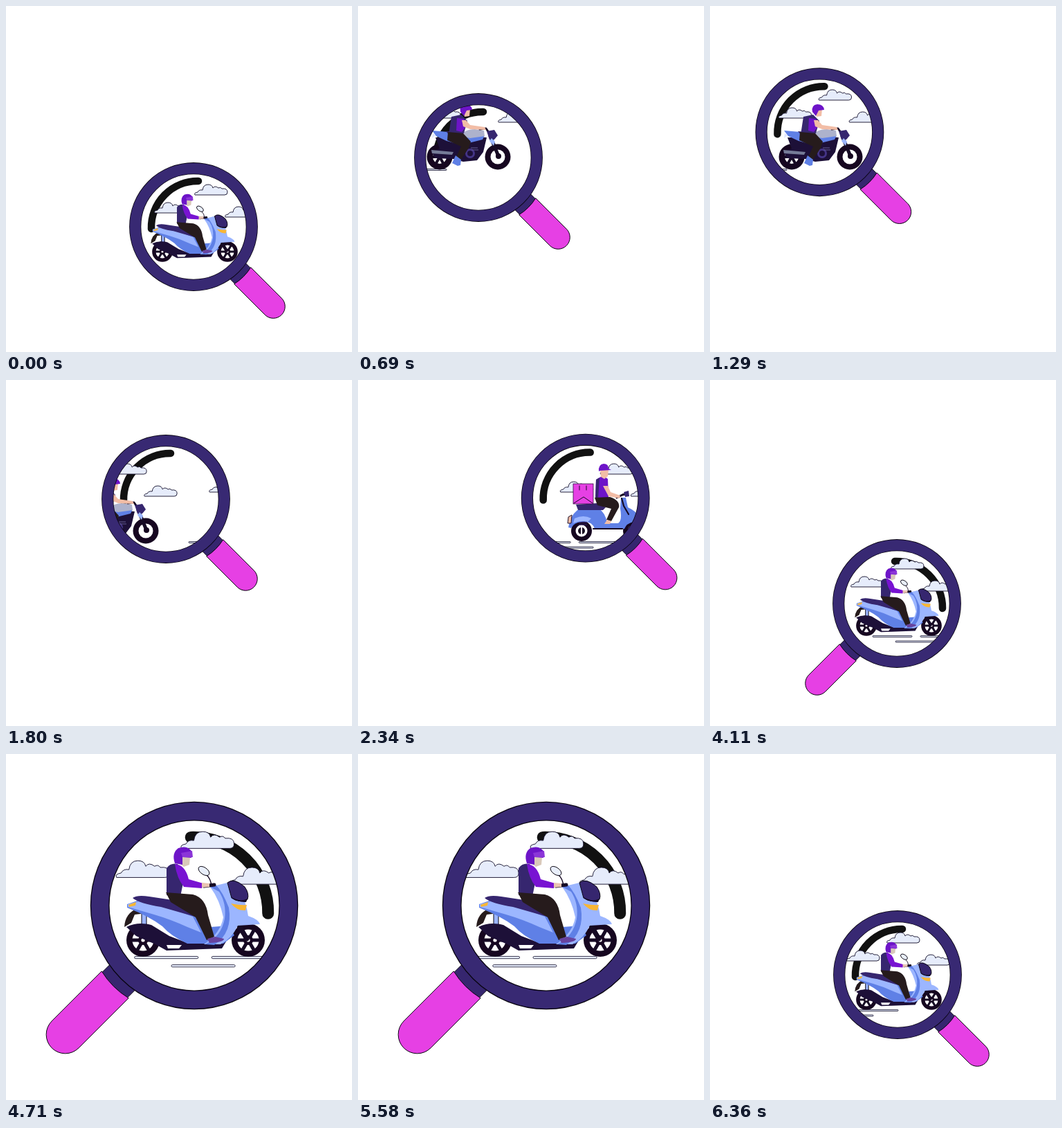
These frames come from a looping animation (500 by 500 pixels, 6.39 s). An HTML page:

```html
<!DOCTYPE html>
<html lang="en">
<head>
<meta charset="utf-8">
<title>Searching for a rider</title>
<style>
  html, body { margin: 0; width: 100%; height: 100%; overflow: hidden; background: #fff; }
  svg { display: block; width: 100vw; height: 100vh; }
  .edge { stroke: #08040f; stroke-width: 1; vector-effect: non-scaling-stroke; }
  .cloud { fill: #e6ecfb; stroke: #100c28; stroke-width: .9; vector-effect: non-scaling-stroke; }
  .streak { fill: #e6ecfb; stroke: #100c28; stroke-width: .8; vector-effect: non-scaling-stroke; }
  .tyre { fill: #160620; }
  .rim { fill: #fff; }
  .navy { fill: #36266f; }
  .night { fill: #1d1038; }
  .sky { fill: #9cb6ff; }
  .blue { fill: #5f80e6; }
  .violet { fill: #6d14c8; }
  .pants { fill: #261b1c; }
  .skin { fill: #f2bda6; }
  .pink { fill: #e640e4; }
  .line { fill: none; stroke: #160a24; stroke-linecap: round; stroke-linejoin: round; }
</style>
</head>
<body>
<svg viewBox="0 0 500 500">
  <defs>
    <clipPath id="hole"><circle id="holeDisc" r="77"/></clipPath>
    <path id="cloud" class="cloud" d="M1 16Q-1 13 5 12Q7 8 12 9Q13 1 20 1Q26 1 27 6Q30 2 35 6Q38 4 40 7Q48 6 48 12Q48 16 44 16Z"/>
    <g id="clouds">
      <use href="#cloud" x="272" y="257"/>
      <use href="#cloud" x="214" y="283"/>
      <use href="#cloud" x="316" y="289"/>
    </g>
    <g id="streaks">
      <rect class="streak" x="-69" y="369.5" width="57" height="2" rx="1"/>
      <rect class="streak" x="0" y="369.5" width="57" height="2" rx="1"/>
      <rect class="streak" x="-36" y="377" width="57" height="2" rx="1"/>
    </g>
    <g id="alloy">
      <circle class="tyre" r="24"/>
      <circle class="rim" r="15.5"/>
      <path class="line" stroke-width="5" d="M-15 0H15M-7.5 -13L7.5 13M7.5 -13L-7.5 13"/>
      <circle class="tyre" r="7"/>
      <circle class="rim" r="2.6"/>
    </g>
  </defs>

  <g id="glare"><path d="M-61 3A67 67 0 0 1 7 -66" fill="none" stroke="#111" stroke-width="10.5" stroke-linecap="round"/></g>

  <g clip-path="url(#hole)">
    <g id="others">
      <g transform="translate(-112 -137)">
        <use class="drift" href="#clouds"/>
        <use id="bikeStreaks" href="#streaks"/>
      </g>
      <g transform="translate(84 -137)">
        <use class="drift" href="#clouds"/>
        <use id="vanStreaks" href="#streaks"/>
      </g>

      <g id="motorbike">
        <circle class="tyre" cx="118" cy="218" r="18.5"/>
        <circle class="rim" cx="118" cy="218" r="10"/>
        <path class="line" stroke-width="4" d="M108 218H128M113 209L123 227M123 209L113 227"/>
        <circle class="tyre" cx="202" cy="218" r="18.5"/>
        <circle class="rim" cx="202" cy="218" r="10.5"/>
        <path class="line" stroke-width="5" d="M191 188L203 217"/>
        <circle class="tyre" cx="203" cy="217" r="4"/>
        <path class="night" d="M112 190L135 190L150 187L186 190L181 211L172 223L152 225L138 221L112 220L106 211L118 206Z"/>
        <path d="M106 208L138 211L136 215L107 213Z" fill="#767c98"/>
        <path class="blue" d="M107 180L130 182L150 190L147 200L128 195L113 188Z"/>
        <path class="navy" d="M127 181L152 183L151 191L133 188Z"/>
        <path class="blue" d="M149 190L183 187L180 193L156 199Z"/>
        <path d="M149 188Q153 178 169 178L182 180L183 188L162 191Z" fill="#adb2cc"/>
        <path class="line" stroke-width="3" d="M176 178L185 177L190 184"/>
        <path class="navy" d="M186 181L197 179L202 187L197 193L190 193Z"/>
        <path class="sky" d="M193 191L198 196L196 202L190 195Z"/>
        <path d="M108 184L112 187L107 191Z" fill="#dfe5ff"/>
        <circle cx="162" cy="213" r="7" fill="#443486"/>
        <circle class="night" cx="162" cy="213" r="4"/>
        <path d="M163 205h10M164 208h10" stroke="#635c91"/>
        <path class="navy" d="M135 160L149 157L158 166L153 184L131 186Z"/>
        <path class="violet" d="M143 162L153 163L157 173L150 182L142 180Z"/>
        <path class="skin" d="M150 165L156 165L162 172L183 175L185 179L162 178L152 174Z"/>
        <path class="skin" d="M151 149L162 149L161 159L154 160Z"/>
        <path class="violet" d="M148 153Q146 143 155 142Q164 142 165 150L157 151L153 159Z"/>
        <path class="pants" d="M130 182L152 184L163 196L160 205L149 222L142 218L149 203L129 194Z"/>
        <path class="blue" d="M141 216L149 222L148 230L144 231L136 227Z"/>
      </g>

      <g id="courier">
        <g id="smallWheel">
          <circle class="tyre" cx="323" cy="218" r="15"/>
          <circle class="rim" cx="323" cy="218" r="8.5"/>
          <circle class="tyre" cx="323" cy="218" r="5"/>
          <path d="M323 212V224" stroke="#fff" stroke-width="2"/>
        </g>
        <use href="#smallWheel" x="75"/>
        <path class="blue" d="M304 213Q306 197 317 188L347 185Q358 192 360 207H376Q382 203 379 186L380 170L387 170L390 184Q407 192 411 207L398 205Q388 207 385 215H342Q338 203 323 205Q312 206 308 214Z"/>
        <path class="sky" d="M313 200Q326 194 337 200L332 205Q322 202 311 207Z"/>
        <path d="M319 206h12M319 209h12" stroke="#36266f"/>
        <path class="line" stroke-width="2.2" d="M381 171L384 182L391 194M340 215H382"/>
        <path class="skin" stroke="#221329" d="M304 198L309 195L308 207L303 207Z"/>
        <path class="navy" d="M315 180L346 178L358 184L354 188L318 188Z"/>
        <rect class="pink" x="311" y="150" width="29" height="29" stroke="#351047" stroke-width=".8"/>
        <path class="line" stroke-width="1" d="M320 153v6M330 153v6M312 178L326 169L339 178"/>
        <path class="line" stroke-width="3" d="M374 170L382 166L389 164"/>
        <path class="navy" d="M384 162L391 160L392 168L386 169Z"/>
        <path class="violet" d="M344 144L354 138L361 143L362 170L343 172Z"/>
        <path class="navy" d="M344 144L349 141L347 171L343 172Z"/>
        <path class="skin" d="M354 153L361 153L365 162L379 167L378 171L362 168Z"/>
        <path class="skin" d="M350 130H362L361 139L356 143L351 140Z"/>
        <path class="violet" d="M348 132Q347 122 355 121Q362 121 362 128L366 130L350 131Z"/>
        <path class="pants" d="M342 170L364 169Q379 174 377 184L366 204L359 202L366 186L346 181Z"/>
        <path class="skin" d="M360 202L366 204L364 208H356Z"/>
      </g>
    </g>

    <g id="mainScene">
      <use class="drift" href="#clouds"/>
      <use id="mainStreaks" href="#streaks"/>
      <g transform="translate(273 355) scale(.6184) translate(-274 -269)">
        <path class="pants" d="M190 223Q172 230 171 250L181 244L186 232L204 230Z"/>
        <use href="#alloy" x="198" y="269"/>
        <use href="#alloy" x="350" y="269"/>
        <path class="line" stroke-width="7" d="M334 244L348 267"/>
        <path class="sky edge" d="M196 230h7v25h-7z"/>
        <path class="night" d="M174 250Q190 242 210 247L236 263L262 273L318 271L312 281L258 283L232 284L216 275L188 263Z"/>
        <path d="M232 276L254 276L250 281L234 281Z" fill="#fff"/>
        <path class="blue" d="M175 217L190 212L245 224L280 234L296 250L322 248L330 262L314 274L262 274Q238 263 226 249Q208 235 175 222Z"/>
        <path class="sky" d="M176 217L192 213L240 224L270 235L282 258L262 250Q238 239 214 232L176 221Z"/>
        <path class="sky" d="M295 192L320 186Q345 197 350 234Q365 239 367 246L335 248Q326 267 310 275L286 275Q310 259 314 236Q309 211 295 192Z"/>
        <path class="blue" d="M295 192L308 199Q319 216 316 238Q311 264 288 275L301 276Q328 258 322 222Q313 199 304 190Z"/>
        <path class="navy" d="M183 208Q190 203 207 206L260 214Q276 222 273 235L224 221Q192 216 183 208Z"/>
        <path class="navy edge" d="M320 186Q329 178 345 192Q352 202 349 210Q337 216 326 208Z"/>
        <path d="M325 206Q338 215 349 209L347 214Q335 215 325 206Z" fill="#130b25"/>
        <path d="M325 216Q340 219 348 218L346 226Q334 227 325 216Z" fill="#f8b634"/>
        <path d="M177 218L188 214L187 219L178 221Z" fill="#f8b634"/>
        <path class="line" stroke-width="1.5" d="M289 174Q296 180 297 191"/>
        <ellipse class="edge" cx="286" cy="169" rx="9" ry="5" transform="rotate(35 286 169)" fill="#e8eefb"/>
        <path class="line" stroke-width="5" d="M286 191L301 189"/>
        <path class="navy" d="M232 165Q238 157 248 159L257 181L252 206L232 204Z"/>
        <path d="M244 159Q259 160 264 181L285 187L283 194L257 192Q247 180 244 159Z" fill="#7813d2"/>
        <path d="M283 186L294 187L294 192L283 193Z" fill="#e9c4b1"/>
        <path d="M252 145L266 149L265 160L257 163L250 157Z" fill="#d9c9ba"/>
        <path class="violet" d="M244 158Q239 143 249 136Q263 131 269 142L268 150L255 149L255 160Z"/>
        <path d="M253 143L269 140L270 149L255 149Z" fill="#8b35d8"/>
        <path class="pants" d="M231 200L270 203Q289 208 292 233L301 264L290 269L274 236L238 214Z"/>
        <path d="M291 267L302 264L315 267Q315 272 294 273Z" fill="#67439f"/>
      </g>
    </g>
  </g>

  <g id="lens">
    <path class="navy edge" d="M60 76L76 60L88 64L66 88Z"/>
    <g transform="rotate(45)">
      <rect class="navy edge" x="85" y="-16" width="20" height="32"/>
      <path class="pink edge" d="M100 -17H163A17 17 0 0 1 163 17H100Q104 0 100 -17Z"/>
    </g>
    <circle r="84.3" fill="none" stroke="#08040f" stroke-width="17.2"/>
    <circle r="84.3" fill="none" stroke="#382973" stroke-width="15.6"/>
  </g>
</svg>

<script>
  const LOOP = 6390, STEP = 30, ZOOM = 1.617;
  const $ = id => document.getElementById(id);

  // Each row: time, then values
  const lensPath = [
    [0, 271, 319], [690, 174, 219], [1040, 156, 193], [1320, 159, 181],
    [1640, 199, 168], [1800, 231, 172], [1980, 272, 185], [2040, 284, 186],
    [2380, 333, 170], [2640, 353, 177], [2880, 357, 177], [3090, 357, 177],
    [3300, 330, 211], [3740, 266.5, 322], [4020, 270, 323], [4110, 270, 323],
    [4670, 272, 219], [5832, 272, 219], [6360, 271, 319]
  ];
  const turn = [[3090, 0], [3700, 90], [5832, 90], [6360, 0]];
  const zoom = [[4110, 0], [4670, 1], [5832, 1], [6360, 0]];
  const mainRun = [[0, 430], [4110, 304], [5580, 260], [6360, 215]];

  const slope = (keys, i, c) => (keys[i + 1][c] - keys[i][c]) / (keys[i + 1][0] - keys[i][0]);

  // Smooth tangent that never overshoots a key
  function tangent(keys, i, c) {
    if (i === 0) return slope(keys, 0, c);
    if (i === keys.length - 1) return slope(keys, i - 1, c);
    const a = slope(keys, i - 1, c), b = slope(keys, i, c);
    return a * b <= 0 ? 0 : 2 * a * b / (a + b);
  }

  function track(keys, t, c = 1, ease = false) {
    const last = keys.length - 1;
    if (t <= keys[0][0]) return keys[0][c];
    if (t >= keys[last][0]) return keys[last][c];
    let i = 0;
    while (t >= keys[i + 1][0]) i++;
    const [p, q] = [keys[i], keys[i + 1]];
    const d = q[0] - p[0], u = (t - p[0]) / d, s = u * u * (3 - 2 * u);
    const base = p[c] + (q[c] - p[c]) * s;
    if (ease) return base;
    const m = tangent(keys, i, c), n = tangent(keys, i + 1, c);
    return base + d * u * (1 - u) * (m * (1 - u) - n * u);
  }

  const place = (el, value) => el.setAttribute('transform', value);
  const drifting = document.querySelectorAll('.drift');

  function draw(t) {
    const x = track(lensPath, t, 1, t >= 4110), y = track(lensPath, t, 2, t >= 4110);
    const z = track(zoom, t, 1, true), scale = 1 + (ZOOM - 1) * z;
    const pose = `translate(${x} ${y}) scale(${scale}) rotate(${track(turn, t, 1, true)})`;
    ['lens', 'glare', 'holeDisc'].forEach(id => place($(id), pose));

    place($('mainScene'), `translate(${273 + z} ${355 - 86 * z}) scale(${scale}) translate(-273 -355)`);
    $('others').style.display = t < 4000 ? '' : 'none';

    drifting.forEach(el => place(el, `translate(${-17 * t / 6360} 0)`));
    place($('mainStreaks'), `translate(${track(mainRun, t)} 0)`);
    place($('bikeStreaks'), `translate(${183 - (t - 690) * .028} 3)`);
    place($('vanStreaks'), `translate(${216 - (t - 3090) * .0256} 1)`);
  }

  const start = performance.now();
  function tick() {
    const t = (performance.now() - start) % LOOP;
    draw(Math.floor(t / STEP) * STEP);
    requestAnimationFrame(tick);
  }
  tick();
</script>
</body>
</html>
```
